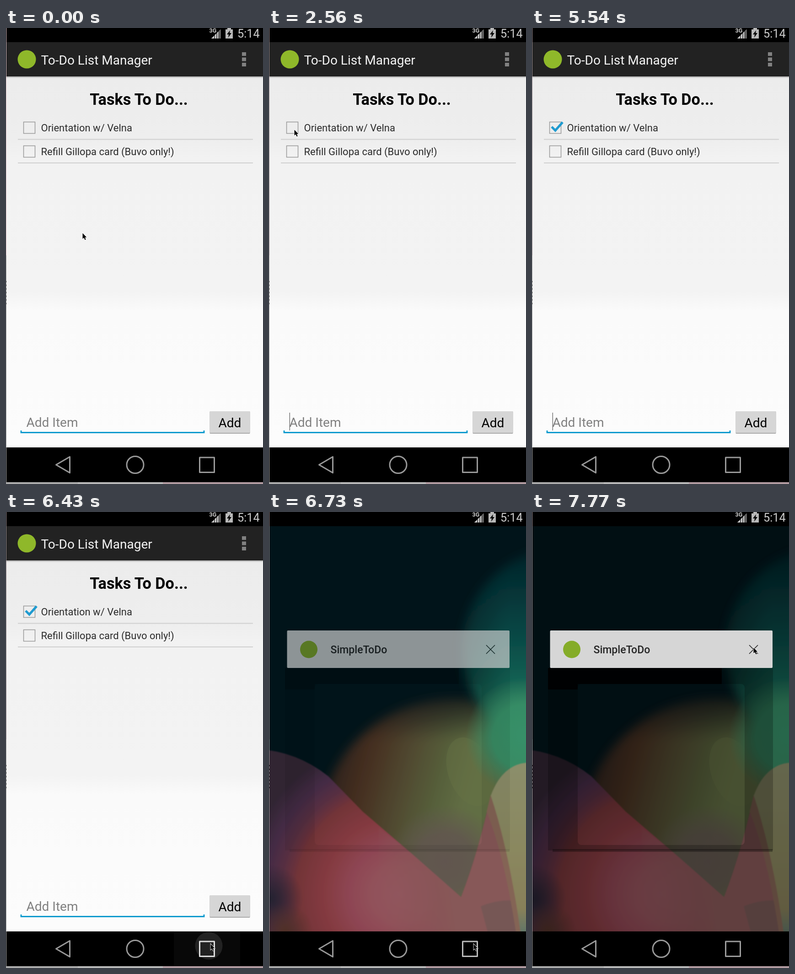
These frames come from a looping animation (562 px wide and 997 px high, 8 s). An HTML page:

```html
<!DOCTYPE html>
<html lang="en">
<head>
<meta charset="utf-8">
<title>To-Do List Manager</title>
<style>
  html, body { margin: 0; width: 100%; height: 100%; overflow: hidden; background: #000; }
  svg { display: block; width: 100%; height: 100%; }
  text { font-family: Roboto, "Noto Sans", sans-serif; }

  .app, .recents, .caret, .check, .ripple, .square, .cursor, .card, .dim, .shade, .edge {
    animation: 8s step-end infinite;
  }
  .app { animation-name: app; }
  .recents { animation-name: recents; }
  .caret { animation-name: caret; }
  .check { animation-name: check; }
  .ripple { animation-name: ripple; }
  .square { animation-name: square; }
  .cursor { animation-name: cursor; }
  .card { animation-name: card; }
  .dim { animation-name: dim; }
  .shade { animation-name: shade; }
  .edge { animation-name: edge; }

  @keyframes app { 0% { opacity: 1 } 82.2%, 100% { opacity: 0 } }
  @keyframes recents { 0% { opacity: 0 } 82.2%, 100% { opacity: 1 } }
  @keyframes caret {
    0%, 12.95%, 24.2%, 37.45%, 50.45%, 63.6%, 74.85%, 100% { opacity: 0 }
    7.45%, 18.6%, 31.95%, 44.95%, 56.1%, 69.2% { opacity: 1 }
  }
  @keyframes check { 0% { opacity: 0 } 33.85%, 100% { opacity: 1 } }
  @keyframes ripple { 0% { opacity: 0 } 78.45% { opacity: .5 } 80.35% { opacity: 1 } 82.2%, 100% { opacity: 0 } }
  @keyframes square {
    0% { stroke: #999 } 78.45% { stroke: #ddd } 82.2% { stroke: #eee }
    84.1% { stroke: #bbb } 85.95%, 100% { stroke: #9c9c9c }
  }
  @keyframes card { 0% { opacity: 0 } 82.2% { opacity: .05 } 84.1% { opacity: .66 } 85.95%, 100% { opacity: 1 } }
  @keyframes dim { 0% { opacity: 0 } 84.1% { opacity: .35 } 85.95% { opacity: .49 } 87.85%, 100% { opacity: .53 } }
  @keyframes shade { 0% { opacity: 0 } 84.1% { opacity: .3 } 85.95%, 100% { opacity: 1 } }
  @keyframes edge { 0% { fill: #d9bcc2 } 22.35%, 100% { fill: #94878b } }
  @keyframes cursor {
    0% { transform: translate(167px, 448px) }
    1.85% { transform: translate(163px, 440px) }
    3.7% { transform: translate(148px, 410px) }
    5.6% { transform: translate(126px, 368px) }
    7.45% { transform: translate(102px, 318px) }
    9.35% { transform: translate(80px, 270px) }
    11.1% { transform: translate(64px, 232px) }
    12.95% { transform: translate(55px, 208px) }
    14.85% { transform: translate(51px, 201px) }
    16.7% { transform: translate(52px, 200px) }
    18.6% { transform: translate(52px, 205px) }
    22.35% { transform: translate(52px, 214px) }
    24.2% { transform: translate(51px, 221px) }
    27.85% { transform: translate(55px, 222px); opacity: 1 }
    41.2% { transform: translate(66px, 216px) }
    43.1% { transform: translate(150px, 330px) }
    44.95% { transform: translate(304px, 560px); opacity: 1 }
    46.85% { transform: translate(304px, 560px); opacity: 0 }
    69.2% { transform: translate(430px, 760px); opacity: 0 }
    71.1% { transform: translate(430px, 760px); opacity: 1 }
    72.95% { transform: translate(440px, 860px) }
    74.85% { transform: translate(445px, 920px) }
    76.6%, 85.95% { transform: translate(447px, 944px) }
    87.85% { transform: translate(452px, 890px) }
    89.7% { transform: translate(462px, 740px) }
    91.6% { transform: translate(474px, 540px) }
    93.45% { transform: translate(482px, 390px) }
    95.2% { transform: translate(485px, 315px) }
    97.1%, 100% { transform: translate(484px, 296px); opacity: 1 }
  }
</style>
</head>
<body>
<svg viewBox="0 0 562 997" xmlns="http://www.w3.org/2000/svg">
  <defs>
    <clipPath id="screen"><rect x="1" y="31" width="561" height="886"/></clipPath>
    <filter id="soft" x="-20%" y="-20%" width="140%" height="140%"><feGaussianBlur stdDeviation="11"/></filter>
    <filter id="fine"><feGaussianBlur stdDeviation="1.2"/></filter>
    <linearGradient id="page" x2="0" y2="1">
      <stop offset="0" stop-color="#ececec"/><stop offset=".17" stop-color="#eeeeee"/>
      <stop offset=".22" stop-color="#f2f2f2"/><stop offset=".58" stop-color="#f3f3f3"/>
      <stop offset=".63" stop-color="#fafafa"/><stop offset="1" stop-color="#fcfcfc"/>
    </linearGradient>
    <linearGradient id="hill" gradientUnits="userSpaceOnUse" x1="140" y1="500" x2="440" y2="580">
      <stop offset="0" stop-color="#40302a"/><stop offset=".28" stop-color="#6b4830"/>
      <stop offset=".55" stop-color="#7a6f4a"/><stop offset=".8" stop-color="#84925a"/>
      <stop offset="1" stop-color="#95a868"/>
    </linearGradient>
    <linearGradient id="hillTop" gradientUnits="userSpaceOnUse" x1="0" y1="390" x2="0" y2="500">
      <stop offset="0" stop-color="#1c2024"/><stop offset="1" stop-color="#1c2024" stop-opacity="0"/>
    </linearGradient>
    <radialGradient id="grey" gradientUnits="userSpaceOnUse" cx="385" cy="765" r="125">
      <stop offset="0" stop-color="#958379"/><stop offset=".5" stop-color="#958379" stop-opacity=".85"/>
      <stop offset="1" stop-color="#958379" stop-opacity="0"/>
    </radialGradient>
    <linearGradient id="teal" gradientUnits="userSpaceOnUse" x1="0" y1="75" x2="0" y2="480">
      <stop offset="0" stop-color="#02303a"/><stop offset=".3" stop-color="#08575a"/>
      <stop offset=".5" stop-color="#0f716c"/><stop offset=".72" stop-color="#1d937e"/>
      <stop offset="1" stop-color="#4bd199"/>
    </linearGradient>
    <linearGradient id="tealEdge" gradientUnits="userSpaceOnUse" x1="412" y1="0" x2="520" y2="0">
      <stop offset="0" stop-color="#02202a" stop-opacity=".6"/><stop offset="1" stop-color="#02202a" stop-opacity="0"/>
    </linearGradient>
    <radialGradient id="glow" gradientUnits="userSpaceOnUse" cx="560" cy="492" r="130">
      <stop offset="0" stop-color="#54dca0"/><stop offset=".55" stop-color="#54d89c" stop-opacity=".95"/>
      <stop offset="1" stop-color="#54c890" stop-opacity="0"/>
    </radialGradient>
    <radialGradient id="rose" gradientUnits="userSpaceOnUse" cx="285" cy="835" r="340">
      <stop offset="0" stop-color="#e28391"/><stop offset=".18" stop-color="#df7c8a"/>
      <stop offset=".32" stop-color="#d96b80"/><stop offset=".48" stop-color="#cb5a63"/>
      <stop offset=".66" stop-color="#b05056"/><stop offset=".76" stop-color="#854764"/>
      <stop offset=".86" stop-color="#69426a"/><stop offset="1" stop-color="#4b384e"/>
    </radialGradient>
    <linearGradient id="blush" gradientUnits="userSpaceOnUse" x1="240" y1="860" x2="400" y2="840">
      <stop offset="0" stop-color="#cf8787" stop-opacity="0"/><stop offset="1" stop-color="#cf8787"/>
    </linearGradient>
    <radialGradient id="night" gradientUnits="userSpaceOnUse" cx="0" cy="845" r="75">
      <stop offset="0" stop-color="#353349"/><stop offset="1" stop-color="#353349" stop-opacity="0"/>
    </radialGradient>
    <radialGradient id="rust" gradientUnits="userSpaceOnUse" cx="35" cy="915" r="60">
      <stop offset="0" stop-color="#7a4a3c"/><stop offset="1" stop-color="#7a4a3c" stop-opacity="0"/>
    </radialGradient>
    <linearGradient id="sand" x2="0" y2="1">
      <stop offset="0" stop-color="#d5daa4"/><stop offset=".5" stop-color="#d4d092"/>
      <stop offset=".85" stop-color="#cfc389"/><stop offset="1" stop-color="#8fb3a2"/>
    </linearGradient>
  </defs>

  <rect width="562" height="997"/>

  <g class="app">
    <rect x="1" y="106" width="561" height="811" fill="url(#page)"/>
    <rect x="1" y="31" width="561" height="75" fill="#222"/>
    <rect x="1" y="106" width="561" height="3" fill="#c9c9c9"/>
    <circle cx="45.5" cy="68.5" r="20" fill="#8fb82a"/>
    <text x="76.5" y="79.5" font-size="28" fill="#f3f3f3">To-Do List Manager</text>
    <path d="M516 53h9v8h-9zM516 64.500h9v8h-9zM516 76h9v8h-9z" fill="#818181"/>
    <text x="290.500" y="167.500" font-size="34.200" font-weight="700" text-anchor="middle">Tasks To Do...</text>
    <g fill="none" stroke="#989898" stroke-width="1.500">
      <rect x="38.500" y="205.500" width="25" height="25"/>
      <rect x="38.500" y="257.500" width="25" height="25"/>
    </g>
    <g font-size="22" fill="#2b2b2b">
      <text x="76.500" y="226">Orientation w/ Velna</text>
      <text x="76.500" y="278">Refill Gillopa card (Buvo only!)</text>
    </g>
    <path d="M26 243.500h514M26 295h514" stroke="#d0d0d0" stroke-width="2"/>
    <path class="check" d="M43 216l8 8 16-18" fill="none" stroke="#1f9bd0" stroke-width="5"/>
    <text x="44.500" y="872" font-size="28" fill="#808080">Add Item</text>
    <rect class="caret" x="44.500" y="841" width="1.500" height="39" fill="#777"/>
    <path d="M33 880v4.500h400v-4.500" fill="none" stroke="#0a9ace" stroke-width="2.800"/>
    <rect x="445.500" y="838" width="88" height="49" rx="1.500" fill="#aaa"/>
    <rect x="446" y="838" width="87" height="47" rx="1" fill="#d6d6d6"/>
    <text x="489.500" y="873" font-size="28" text-anchor="middle">Add</text>
  </g>

  <g class="recents" clip-path="url(#screen)">
    <rect y="31" width="562" height="886" fill="#021f28"/>
    <g filter="url(#soft)">
      <circle cx="405" cy="705" r="297" fill="url(#hill)"/>
      <circle cx="405" cy="705" r="297" fill="url(#hillTop)"/>
    </g>
    <ellipse cx="440" cy="568" rx="48" ry="78" fill="#9bae68" opacity=".45" transform="rotate(-20 440 568)"/>
    <rect x="250" y="620" width="260" height="260" fill="url(#grey)"/>
    <g filter="url(#soft)">
      <circle cx="645" cy="300" r="222" fill="url(#teal)"/>
      <circle cx="645" cy="300" r="222" fill="url(#tealEdge)"/>
    </g>
    <rect x="425" y="360" width="137" height="265" fill="url(#glow)"/>
    <g filter="url(#fine)">
      <path id="dune" d="M-5 520Q70 530 130 578L205 655 310 745 420 842Q452 760 478 650Q530 760 560 925H-5Z" fill="url(#rose)"/>
      <path d="M240 690L310 745 420 842Q452 760 478 650Q530 760 560 925H240Z" fill="url(#blush)"/>
      <path d="M463 862Q500 846 540 850L550 925H480Z" fill="#b08683" opacity=".8"/>
      <path d="M476 655L485 618Q525 740 556 925H541Q515 750 476 655Z" fill="#cb9a82"/>
      <path d="M485 620Q512 548 570 548V925H551Q525 740 485 620Z" fill="url(#sand)"/>
    </g>
    <rect y="770" width="75" height="150" fill="url(#night)"/>
    <rect y="855" width="95" height="62" fill="url(#rust)"/>
    <rect class="dim" y="31" width="562" height="886"/>
    <g class="shade">
      <path d="M35 341H527V740H35ZM108 376a8 8 0 0 0-8 8V720a8 8 0 0 0 8 8H457a8 8 0 0 0 8-8V384a8 8 0 0 0-8-8Z" fill-rule="evenodd" opacity=".22"/>
      <path d="M35 341H415V376H100V388H35Z" opacity=".85"/>
      <rect x="45" y="737" width="481" height="6" opacity=".3"/>
    </g>
    <g class="card">
      <rect x="39.500" y="259" width="486.500" height="82" rx="2" fill="#d6d6d6"/>
      <circle cx="87" cy="300.500" r="19" fill="#85ac28"/>
      <text x="134.500" y="309" font-size="23" font-weight="500" fill="#262626">SimpleToDo</text>
      <path d="M475 291l19 19m0-19l-19 19" stroke="#222" stroke-width="1.600"/>
    </g>
  </g>

  <g fill="#cdcdcd">
    <path d="M449 23H469.500V2.500Z" fill="#777"/>
    <path d="M449 23H465V7Z"/>
    <path d="M456 13v10M461 10v13M465.500 6v17" stroke="#000" stroke-width="1.200"/>
    <text x="444.500" y="9.500" font-size="12.500" font-weight="700" stroke="#000" stroke-width="2" paint-order="stroke">3G</text>
    <path d="M480 3h4V0h8v3h4v20h-16z" fill="#b9b9b9"/>
    <path d="M490 5l-7 9h4l-1 7 7-10h-4z" fill="#000"/>
    <text x="506" y="21" font-size="25.300">5:14</text>
  </g>

  <g class="ripple">
    <rect x="367" y="917" width="145" height="76" fill="#080808"/>
    <circle cx="443.500" cy="948.500" r="30" fill="#222"/>
  </g>
  <g fill="none" stroke="#999" stroke-width="3" stroke-linejoin="round">
    <path d="M109.500 955L139.500 937.500V972.500Z"/>
    <circle cx="282.500" cy="955" r="18.500"/>
    <rect class="square" x="423.500" y="939" width="32" height="32.500"/>
  </g>

  <rect y="993" width="157" height="4" fill="#aaa"/>
  <rect x="157" y="993" width="186" height="4" fill="#b8b8b8"/>
  <rect x="343" y="993" width="219" height="4" fill="#b19aa0"/>
  <rect width="1" height="997" fill="#a2a2a2"/>
  <rect class="edge" width="1" height="497"/>
  <path d="M.5 553V607" stroke="#222" stroke-dasharray="3 5"/>

  <g class="cursor">
    <path d="M.5.500V13L3.400 10.400 5.600 15.300 7.700 14.400 5.600 9.700H9.300Z" stroke="#fff" stroke-width="1.600" paint-order="stroke"/>
  </g>
</svg>
</body>
</html>
```
